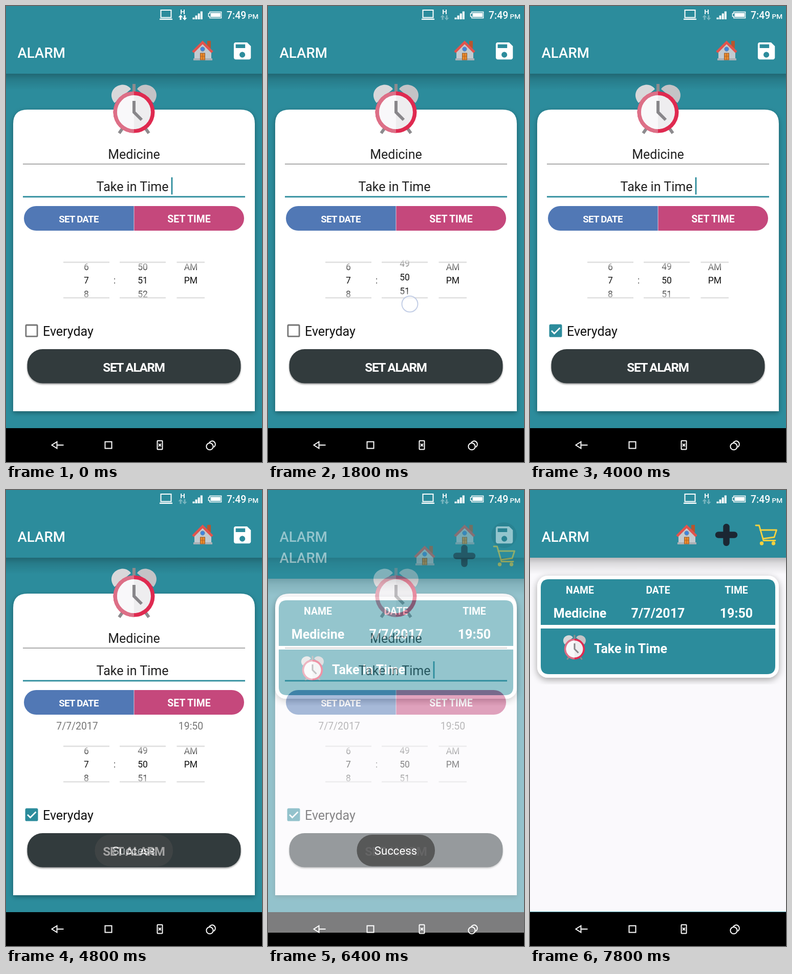
Recreate the animation shown at these times as an HTML page. Size 500 by 889 pixels, loop 8 s.

```html
<!DOCTYPE html>
<html lang="en">
<head>
<meta charset="utf-8">
<title>Alarm app</title>
<style>
html, body { margin: 0; width: 100%; height: 100%; overflow: hidden; background: #000; }
svg { display: block; width: 100vw; height: 100vh; font-family: Roboto, sans-serif; }
.m { text-anchor: middle; }
.b { font-weight: 700; }
</style>
</head>
<body>
<svg id="stage" viewBox="0 0 500 889"></svg>
<script>
const TEAL = '#2c8c9c', stage = document.getElementById('stage');

const rect = (x, y, w, h, fill, more = '') =>
  `<rect x="${x}" y="${y}" width="${w}" height="${h}" fill="${fill}" ${more}/>`;
const text = (x, y, size, str, fill = '#fff', more = 'class="m"') =>
  `<text x="${x}" y="${y}" font-size="${size}" fill="${fill}" ${more}>${str}</text>`;
const bold = (x, y, size, str, spacing = 0) =>
  text(x, y, size, str, '#fff', `class="m b" letter-spacing="${spacing}"`);
const path = (d, stroke, width, more = '') =>
  `<path d="${d}" fill="none" stroke="${stroke}" stroke-width="${width}" ${more}/>`;
const shape = (d, fill, more = '') => `<path d="${d}" fill="${fill}" ${more}/>`;
const circle = (x, y, r, fill, more = '') => `<circle cx="${x}" cy="${y}" r="${r}" fill="${fill}" ${more}/>`;
const shadow = (id, dy, blur, alpha) =>
  `<filter id="${id}" x="-20%" y="-20%" width="140%" height="150%">
    <feDropShadow dx="0" dy="${dy}" stdDeviation="${blur}" flood-opacity="${alpha}"/></filter>`;

const defs = `<defs>
  ${shadow('low', 2, 1.5, .4)}${shadow('high', 5, 3, .45)}${shadow('sheet', 3, 5, .35)}${shadow('tile', 4, 7, .35)}
  <linearGradient id="under" x2="0" y2="1">
    <stop stop-opacity=".26"/><stop offset=".35" stop-opacity=".12"/><stop offset="1" stop-opacity="0"/></linearGradient>
  <linearGradient id="fade" gradientUnits="userSpaceOnUse" x1="0" x2="0" y1="492" y2="578">
    <stop stop-color="#000"/><stop offset=".33" stop-color="#fff"/>
    <stop offset=".67" stop-color="#fff"/><stop offset="1" stop-color="#000"/></linearGradient>
  <mask id="wheel" maskUnits="userSpaceOnUse" x="100" y="490" width="300" height="80">
    ${rect(100, 490, 300, 79, 'url(#fade)')}</mask>
  <clipPath id="row">${rect(0, 132, 500, 247, '#000')}</clipPath>
  <clipPath id="screen">${rect(0, 0, 500, 822, '#000')}</clipPath>

  <g id="clock">
    ${path('M-22 31L-29 41M22 31L29 41', '#8d8b8e', 6)}
    ${rect(-3, -55, 6, 17, '#8d8b8e')}
    ${shape('M-38 -18C-50 -32 -43 -50 -26 -53C-17 -55 -9 -50 -6 -45Z', '#d9d8da')}
    ${shape('M38 -18C50 -32 43 -50 26 -53C17 -55 9 -50 6 -45Z', '#c4c3c6')}
    ${circle(0, 0, 40.5, '#df2a50')}${shape('M0 -40.5A40.5 40.5 0 0 0 0 40.5Z', '#dd6f87')}
    ${circle(0, 0, 33, '#eeedef')}${shape('M0 -33A33 33 0 0 0 0 33Z', '#f9f8fa')}
    ${path('M0 -22V0L15 15', '#88868a', 6)}
  </g>
  <g id="house">
    ${rect(9, -19, 7, 14, '#b5562f')}
    ${shape('M-16 18V-1L0 -17L17 -1V18Z', '#c3cacf')}
    ${rect(-18, 15, 37, 4, '#aab0b5')}
    ${path('M-19 3L0 -16L19 3', '#e2534c', 5)}
    ${circle(0, -3, 4.2, '#3f84e0', 'stroke="#7d8a99"')}
    ${rect(-4.5, 5, 9, 13, '#ea8a2c', 'stroke="#8c5a2c"')}
    ${path('M0 5V18M-4 11H4', '#b3621f', 1)}
  </g>
</defs>`;

const header = rect(0, 0, 500, 132, TEAL) + rect(0, 132, 500, 32, 'url(#under)')
  + text(22.5, 101, 27.6, 'ALARM', '#fff', 'font-weight="500"');

const values = (x, list) => list.map((v, i) => v === '' ? '' : text(x, 514.5 + i * 26.7, 17.5, v, '#111')).join('');
const ends = (x, w) => rect(x, 498.3, w, 2.6, '#e0e0e0') + rect(x, 567.6, w, 2.6, '#e0e0e0');

const editor = rect(0, 0, 500, 823, TEAL) + header
  + '<use href="#house" x="384" y="87"/>'
  + circle(461, 88, 25, '#000', 'id="saveRipple" opacity=".13"')
  + shape('M17 3H5c-1.1 0-2 .9-2 2v14c0 1.1.9 2 2 2h14c1.1 0 2-.9 2-2V7l-4-4zm-5 16c-1.66 0-3-1.34-3-3s1.34-3 3-3 3 1.34 3 3-1.34 3-3 3zm3-10H5V5h10v4z',
    '#fff', 'transform="translate(439.4 65.4) scale(1.85)"')
  + shape('M14 790V230Q14 202 42 202H458Q486 202 486 230V790Z', '#fff', 'filter="url(#sheet)"')
  + '<use href="#clock" x="250" y="207"/>'
  + text(250, 298, 25, 'Medicine', '#212121') + rect(33, 307.5, 434, 1.3, '#808080')
  + text(247, 361, 25, 'Take in Time', '#212121') + rect(33, 370.5, 434, 2.8, TEAL)
  + rect(322.6, 334, 2.8, 33.5, TEAL, 'id="cursor"')
  + shape('M250 390H59A24 24 0 0 0 59 438H250Z', '#5178b5')
  + shape('M250 390H441A24 24 0 0 1 441 438H250Z', '#c5487c')
  + rect(249.5, 390, 1, 48, '#d7c5dc')
  + bold(142, 422, 18.6, 'SET DATE', -.7) + bold(357.5, 422, 19.4, 'SET TIME')
  + `<g id="chosen">${text(139, 466.5, 19.4, '7/7/2017', '#757575')}${text(361, 466.5, 19.4, '19:50', '#757575')}</g>`
  + ends(112, 90) + ends(222, 90) + ends(333.5, 54.5)
  + `<g mask="url(#wheel)">${values(157, [6, 7, 8])}${values(361, ['AM', 'PM'])}
     <g id="minutes" >${[49, 50, 51, 52, 53].map(v => text(267, 541.2 + (v - 51) * 26.7, 17.5, v, '#111')).join('')}</g></g>`
  + text(212, 541, 17.5, ':', '#444')
  + circle(50, 633, 27, TEAL, 'id="boxRipple" opacity=".2"')
  + rect(38.9, 622, 22.2, 22.2, 'none', 'id="box" rx="1.5" stroke="#757575" stroke-width="2.8"')
  + path('M42 633L47.5 638.5L58.5 627.5', '#fff', 2.8, 'id="tick"')
  + text(72, 642.5, 25, 'Everyday', '#111', '')
  + rect(41.5, 669, 417, 66.5, '#323a3d', 'id="button" rx="30"')
  + bold(249.5, 712.5, 24.2, 'SET ALARM', -1.25);

const list = rect(0, 0, 500, 822, '#faf9fc') + header
  + '<use href="#house" x="306" y="87"/>'
  + path('M383.5 72V103M368 87.5H399', '#1b2733', 12.5, 'stroke-linecap="round"')
  + path('M441 69H447.5L456 98.5H479M449.5 78H481.5L477 92L455 95', '#f6d13e', 2.8, 'stroke-linecap="round" stroke-linejoin="round"')
  + circle(452.5, 104, 3.7, '#f6d13e') + circle(475.5, 104, 3.7, '#f6d13e')
  + `<g clip-path="url(#row)">${rect(14, 167, 472, 199, '#fff', 'rx="21" filter="url(#tile)"')}</g>`
  + shape('M21 263V190Q21 174 37 174H463Q479 174 479 190V263Z', TEAL)
  + shape('M21 270V343Q21 359 37 359H463Q479 359 479 343V270Z', TEAL)
  + bold(97.5, 202, 19.4, 'NAME') + bold(250, 202, 19.4, 'DATE') + bold(403, 202, 19.4, 'TIME')
  + bold(97.5, 249, 25, 'Medicine') + bold(250, 249, 25, '7/7/2017') + bold(403, 249, 25, '19:50')
  + '<use href="#clock" transform="translate(87 310) scale(.5)"/>'
  + text(125, 318, 25, 'Take in Time', '#fff', 'class="b"');

const status = path('M302.5 8H322.5V22.5H302.5Z', '#fff', 2) + rect(300, 24.6, 25, 2.4, '#fff')
  + bold(345, 16, 13.5, 'H')
  + `<g id="arrows">${shape('M341 17L345.5 22H342.5V27H339.5V22H336.5Z', '#fff')}
     ${shape('M349 28L353.5 23H350.5V18H347.5V23H344.5Z', '#fff')}</g>`
  + [0, 1, 2, 3].map(i => rect(364.5 + i * 5.1, 22.5 - i * 4, 4, 3.5 + i * 4, '#fff')).join('')
  + path('M398 11.5H420.5V23.5H398V20.5H395.5V14.5H398Z', '#fff', 1.5) + rect(399.5, 13.5, 19.5, 8, '#fff')
  + text(431, 25, 19.4, '7:49', '#fff', 'font-weight="500"')
  + text(472.5, 25, 13.6, 'PM', '#fff', 'font-weight="500"');

const nav = path('M99.5 849.5L89.5 856L99.5 862.5ZM99.5 856H112.5', '#fff', 2)
  + path('M193.5 849.5H206.5V862.5H193.5Z', '#fff', 2)
  + rect(295.5, 847.5, 10, 17, 'none', 'rx="1" stroke="#fff" stroke-width="2"')
  + path('M298 853.5L303 858.5M303 853.5L298 858.5', '#fff', 1.8)
  + path('M397 851.5A6.3 6.3 0 1 1 405.5 860', '#fff', 2) + circle(398, 858.7, 6.6, 'none', 'stroke="#fff" stroke-width="2"');

stage.innerHTML = defs + rect(0, 0, 500, 889, '#000') + editor
  + `<g id="list"><g clip-path="url(#screen)">${list}</g></g>` + status + nav
  + `<g id="toast">${rect(173.5, 672, 152.5, 61.5, '#4d4d4d', 'rx="30" fill-opacity=".86"')}${text(249.5, 711, 22.2, 'Success')}</g>`
  + circle(0, 0, 15.5, '#fff', 'id="touch" fill-opacity=".55" stroke="#b9c6e2" stroke-opacity=".85" stroke-width="2"');

const el = id => document.getElementById(id);
const set = (id, attrs) => { for (const k in attrs) el(id).setAttribute(k, attrs[k]); };
const show = (id, on) => set(id, { visibility: on ? 'visible' : 'hidden' });

// Linear interpolation through [time, value] points
function track(t, points) {
  let [t0, v0] = points[0];
  for (const [t1, v1] of points) {
    if (t < t1) return t <= t0 ? v0 : v0 + (v1 - v0) * (t - t0) / (t1 - t0);
    [t0, v0] = [t1, v1];
  }
  return v0;
}

function touchAt(t, scroll) {
  if (t >= 1000 && t < 2200) return [277, 560.3 + scroll];
  if (t === 3600) return [52, 638];
  if (t === 4600) return [262, 706];
  if (t === 6000) return [462, 90];
}

function draw(t) {
  const scroll = track(t, [[1000, 0], [1800, 20.7], [2000, 20.7], [2400, 26.7]]);
  const checked = t >= 3800, pressed = t === 4600;
  const touch = touchAt(t, scroll);

  show('cursor', t % 1000 < (t < 3000 ? 400 : 600));
  set('arrows', { opacity: t < 1000 ? 1 : .35 });
  set('minutes', { transform: `translate(0 ${scroll})` });
  show('boxRipple', t >= 3600 && t < 4000);
  set('box', { fill: checked ? TEAL : 'none', stroke: checked ? TEAL : '#757575' });
  show('tick', checked);
  show('chosen', t >= 4800);
  set('button', { filter: `url(#${pressed ? 'high' : 'low'})`, fill: pressed ? '#4a5154' : '#323a3d' });
  show('saveRipple', t >= 6000);
  set('list', {
    opacity: track(t, [[6200, 0], [6400, .5], [6600, 1]]),
    transform: `translate(0 ${track(t, [[6200, 71], [6400, 41], [6600, 0]])})`
  });
  set('toast', { opacity: track(t, [[4600, 0], [4800, .6], [5000, 1], [6600, 1], [7000, 0]]) });
  show('touch', touch);
  if (touch) set('touch', { cx: touch[0], cy: touch[1] });
}

function frame() {
  draw(Math.floor(performance.now() % 8000 / 200) * 200);
  requestAnimationFrame(frame);
}
frame();
</script>
</body>
</html>
```
